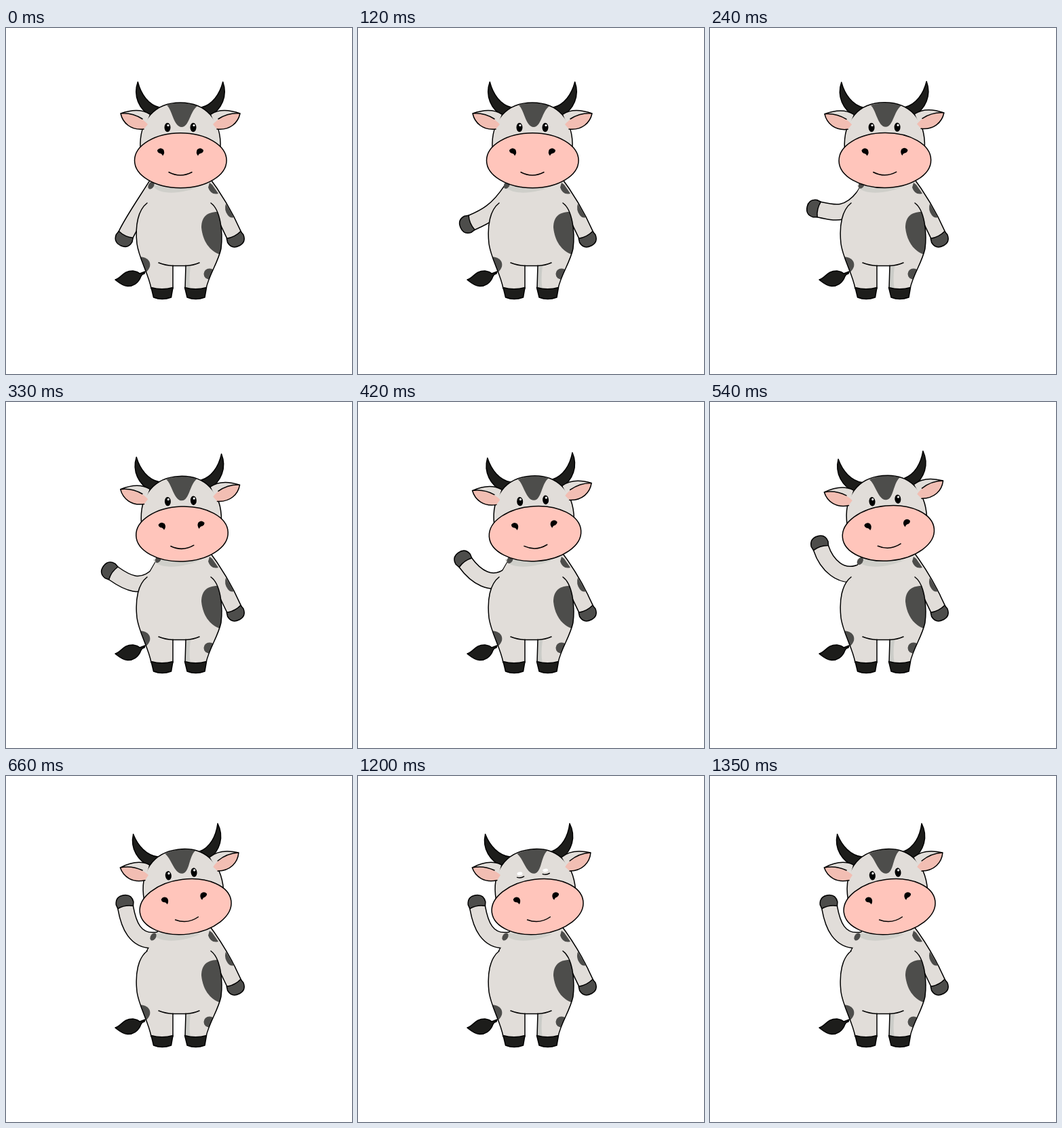
These frames come from a looping animation (510x510 px, 4500 ms). An HTML page:

```html
<!DOCTYPE html>
<html lang="en">
<head>
<meta charset="utf-8">
<title>Waving cow</title>
<style>
  html, body { margin: 0; height: 100%; overflow: hidden; background: #fff; }
  svg { display: block; width: 100vw; height: 100vh; }
  .line { fill: none; stroke: #000; }
  .skin { fill: #e1ddd9; }
  .spot { fill: #4d4d4b; }
  .pink { fill: #ffc5bb; }
  .dark { fill: #1d1d1b; }
  .edge { stroke: #000; }
  .limb { fill: none; stroke: #000; stroke-width: 24.5; }
  .limb.inner { stroke: #e1ddd9; stroke-width: 21.5; }
</style>
</head>
<body>
<svg viewBox="0 0 510 510" stroke-width="1.5" stroke-linecap="round" stroke-linejoin="round">
  <defs>
    <path id="torso" d="M226 226L208 258C195 268 190 290 193 318C196 340 210 362 214 384L246 384V350H265L264 384H295C299 364 313 345 317 325C320 300 316 268 302 258L288 226Z"/>
    <clipPath id="inTorso"><use href="#torso"/></clipPath>
    <path id="hoof" class="spot edge" d="M0 -11.5Q4 0 0 11.5L6 13Q18 12 18 0Q18 -12 6 -13Z"/>
    <path id="foot" class="dark edge" d="M214 382.5Q230 387 246 382.5L243.5 397Q230 402 217.5 397Z"/>
    <path id="horn" class="dark edge" d="M194.300 79.500C187 100 196 120 214 130L226 117C210 113 199 98 194.300 79.500Z"/>
    <g id="ear">
      <path class="skin" d="M212 127C198 118 180 122 169 126C172 140 184 151 203 149Z"/>
      <path fill="#f2beb3" d="M169 126C185 125 201 132 209 142L203 149C184 151 172 140 169 126Z"/>
      <path class="line" d="M212 127C198 118 180 122 169 126C172 140 184 151 203 149M169 126C181 125 193 129 201 134"/>
    </g>
    <path id="nostril" d="M223 180Q227 175 232 179Q235 184 231 188.500Q230 185 226 184.500Q223 183 223 180Z"/>
    <g id="eye">
      <ellipse rx="4.500" ry="6.700"/>
      <circle cx="1" cy="-3" r="1.600" fill="#fff"/>
    </g>
    <g id="lid">
      <ellipse cx="-.5" cy="-3" rx="4" ry="2.500" fill="#fff"/>
      <path class="line" d="M-5 2Q0 4.500 5 2"/>
    </g>
  </defs>

  <path class="dark edge" d="M161 371C171 368 172 358 187 358Q194 359 197 362Q200 361 205 359L204 362Q200 363 199 366C195 377 186 381 179 380.500C171 380 166 375 161 371Z"/>
  <path class="line" d="M226 227L208 258" stroke-width="2.600"/>

  <path class="limb" d="M288 224Q317 262 336 305"/>
  <path class="limb inner" d="M288 224Q317 262 336 305"/>
  <use href="#hoof" transform="translate(335.500 305) rotate(63)"/>

  <path id="armEdge" class="limb"/>
  <path id="armFill" class="limb inner"/>
  <use id="hand" href="#hoof"/>

  <use href="#torso" class="skin"/>
  <g class="spot" clip-path="url(#inTorso)">
    <path d="M312 271C295 271 288 280 288 294C290 314 300 329 316 334L325 300Z"/>
    <ellipse cx="300" cy="362.500" rx="8.500" ry="8"/>
    <path d="M190 337C207 336 214 342 212 352C210 357 207 360 203 363Z"/>
    <path d="M264 351H272Q269 372 272 385H264Z" fill="#cbccc8"/>
  </g>
  <path class="spot" d="M300 228L304 231L313 244Q302 247 298 235Z"/>
  <path class="spot" d="M324 259Q321 268 327 276Q331 281 336 279Z"/>
  <path d="M217 232C222 247 262 245 286 233Z" fill="#cfcfca"/>
  <ellipse id="patch" class="spot" rx="6" ry="4"/>
  <path class="line" d="M208 258C195 268 190 290 193 318C196 340 210 362 214 384M302 258C316 268 320 300 317 325C313 345 299 364 295 384M225 346Q235 350 246 350.500H265Q276 350 285 346M246 350V384M265 350L264 384"/>
  <use href="#foot"/>
  <use href="#foot" x="49.500"/>

  <g id="head">
    <use href="#horn"/>
    <use href="#horn" transform="matrix(-1 0 0 1 514 0)"/>
    <path class="skin" d="M198 178C196 135 220 110 257 110C294 110 318 135 316 178Z"/>
    <path class="spot" d="M237 114C250 109 268 109 282 115C271 123 270 146 259 146C247 146 245 120 237 114Z"/>
    <path class="line" d="M198 178C196 135 220 110 257 110C294 110 318 135 316 178"/>
    <use href="#ear"/>
    <use href="#ear" transform="matrix(-1 0 0 1 514 0)"/>
    <ellipse class="pink edge" cx="257.300" cy="195.200" rx="67.800" ry="40.500"/>
    <use href="#nostril"/>
    <use href="#nostril" transform="matrix(-1 0 0 1 514 0)"/>
    <path class="line" d="M240 212.500Q257 221.500 274 212.500"/>
    <g id="open"><use href="#eye" x="238" y="146.500"/><use href="#eye" x="276" y="146.500"/></g>
    <g id="shut"><use href="#lid" x="238" y="146.500"/><use href="#lid" x="276" y="146.500"/></g>
  </g>
</svg>
<script>
const LOOP = 4500, STEP = 30, RAISED = 660, HEAD_START = 210;
const $ = id => document.getElementById(id);
const set = (id, name, value) => $(id).setAttribute(name, value);
const clamp = v => Math.min(1, Math.max(0, v));

// point at a distance and angle (degrees) from another point
function polar([x, y], length, angle) {
  const a = angle * Math.PI / 180;
  return [x + length * Math.cos(a), y + length * Math.sin(a)];
}

// k runs from 0 (arm hanging) to 1 (arm raised)
function drawArm(k) {
  const swing = Math.sin(Math.PI * k);
  const handTurn = 115 + 145 * (1 - (1 - k) ** 1.7);
  const shoulder = [226, 224 + 17 * k + 20 * swing];
  const wrist = polar([213, 245], 55 + 45 * (k - 0.57) ** 2, 121.4 + 113 * k ** 1.15);
  const elbowIn = polar(shoulder, 38, 122 + 46 * k * k);
  const elbowOut = polar(wrist, -22, handTurn);

  const path = `M${shoulder}C${elbowIn} ${elbowOut} ${wrist}`;
  set('armEdge', 'd', path);
  set('armFill', 'd', path);
  set('hand', 'transform', `translate(${wrist}) rotate(${handTurn})`);
  set('patch', 'transform', `translate(${214 + 3 * k + 9 * swing} ${232 + 5 * k - 3 * swing}) rotate(-59)`);
}

function draw() {
  const t = Math.floor(performance.now() % LOOP / STEP) * STEP;
  drawArm(clamp(t / RAISED));

  const tilt = clamp((t - HEAD_START) / (RAISED - HEAD_START));
  set('head', 'transform', `rotate(${-7.2 * tilt * (1.15 - 0.15 * tilt)} 241 136)`);

  const blink = t >= 1200 && t < 1350;
  set('open', 'display', blink ? 'none' : 'inline');
  set('shut', 'display', blink ? 'inline' : 'none');
  requestAnimationFrame(draw);
}
draw();
</script>
</body>
</html>
```
